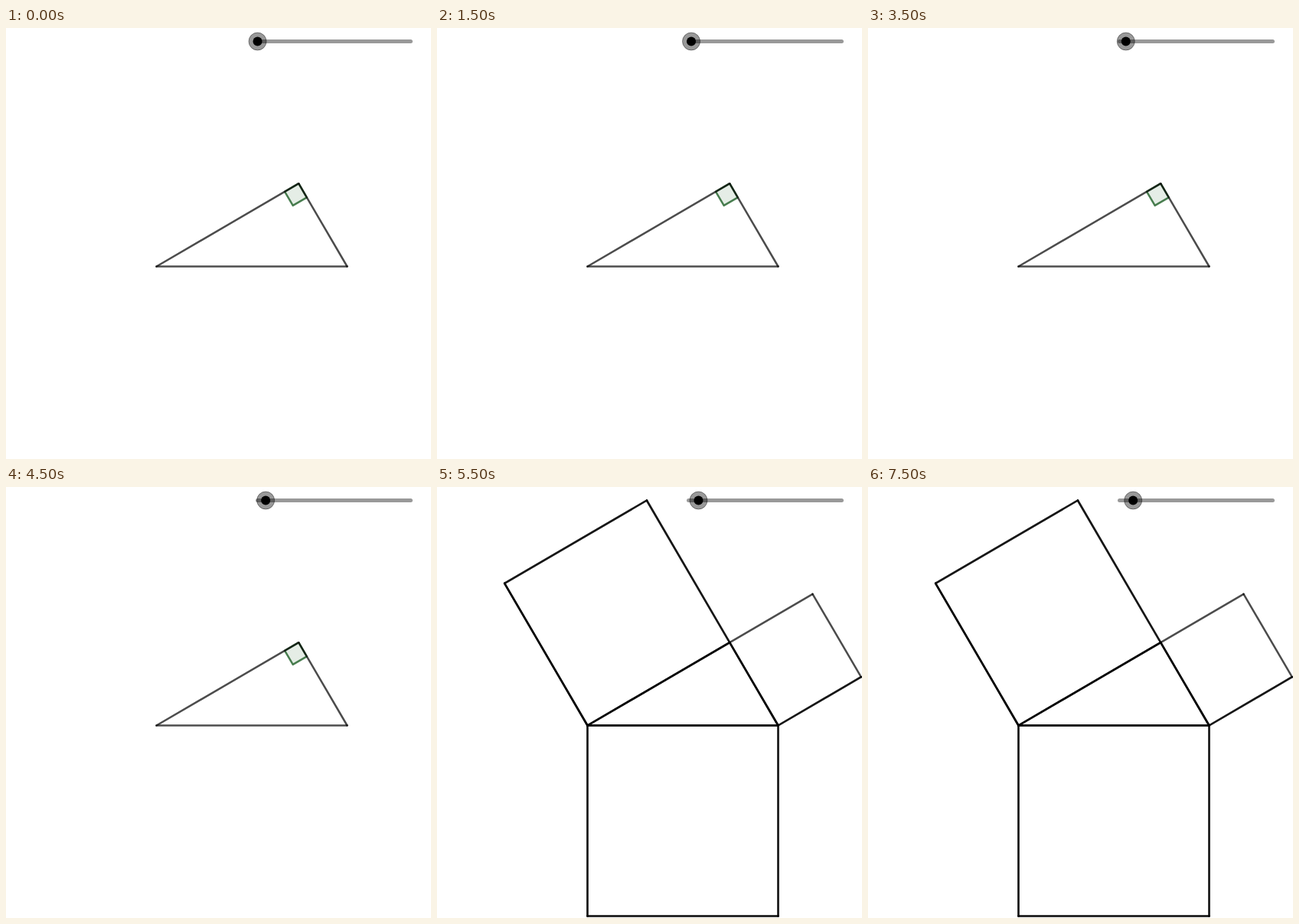
Recreate the animation shown at these times as an HTML page. Size 555x563 px, loop 8000 ms.

```html
<!DOCTYPE html>
<html lang="en">
<head>
<meta charset="utf-8">
<title>Squares on a right triangle</title>
<style>
  html, body { margin: 0; width: 100%; height: 100%; overflow: hidden; background: #fff; }
  svg { display: block; width: 555px; height: 563px; }
  .edge { stroke: #000; stroke-opacity: .7; stroke-width: 2.5; stroke-linecap: round; }
  #corner { fill: rgba(0, 75, 10, .1); stroke: rgba(0, 75, 10, .7); stroke-width: 2.5; stroke-linejoin: round; }
  #track { stroke: #000; stroke-opacity: .4; stroke-width: 5; stroke-linecap: round; }
</style>
</head>
<body>
<svg viewBox="0 0 555 563">
  <polygon id="corner"/>
  <g id="triangle"></g>
  <g id="squares"></g>
  <line id="track" x1="328.5" y1="17.5" x2="528.5" y2="17.5"/>
  <g id="knob">
    <circle r="11.5" fill="#000" fill-opacity=".4" stroke="#000" stroke-opacity=".4"/>
    <circle r="6"/>
  </g>
</svg>
<script>
  const LOOP = 8000, STEP = 500;
  const SQUARES_AT = 5000, CORNER_OFF = 5500;
  const KNOB_START = 328.5, KNOB_STEP = 1.18;

  const $ = id => document.getElementById(id);
  const add = (p, q) => [p[0] + q[0], p[1] + q[1]];
  const sub = (p, q) => [p[0] - q[0], p[1] - q[1]];
  const turn = ([x, y]) => [y, -x];
  const along = (p, q, d) => {
    const v = sub(q, p), k = d / Math.hypot(...v);
    return [v[0] * k, v[1] * k];
  };

  const A = [196.5, 311.5], B = [445.5, 311.5], C = [382.2, 203.2];

  // Outer corners of the square on each side
  const outer = (p, q) => [p, q].map(v => add(v, turn(sub(q, p))));
  const [A1, C1] = outer(A, C);
  const [C2, B2] = outer(C, B);
  const [B3, A3] = outer(B, A);

  // Overlapping translucent passes build up the darker lines
  function edge(group, p, q, passes = 1) {
    for (let i = 0; i < passes; i++) {
      const line = document.createElementNS('http://www.w3.org/2000/svg', 'line');
      const ends = { x1: p[0], y1: p[1], x2: q[0], y2: q[1], class: 'edge' };
      for (const key in ends) line.setAttribute(key, ends[key]);
      group.append(line);
    }
  }

  const triangle = $('triangle'), squares = $('squares'), corner = $('corner'), knob = $('knob');

  [[A, B], [B, C], [C, A]].forEach(([p, q]) => {
    edge(triangle, p, q);
    edge(squares, p, q, 2);
  });
  [
    [A, A1, 3], [A1, C1, 2], [C1, C, 2],
    [C, C2, 1], [C2, B2, 1], [B2, B, 2],
    [B, B3, 2], [B3, A3, 2], [A3, A, 2]
  ].forEach(([p, q, n]) => edge(squares, p, q, n));

  const toA = along(C, A, 21), toB = along(C, B, 21);
  corner.setAttribute('points',
    [C, add(C, toA), add(add(C, toA), toB), add(C, toB)].join(' '));

  const show = (el, on) => { el.style.visibility = on ? 'visible' : 'hidden'; };

  function draw(now) {
    const t = now % LOOP;
    const x = KNOB_START + KNOB_STEP * Math.floor(t / STEP);
    knob.setAttribute('transform', `translate(${x} 17.5)`);
    show(squares, t >= SQUARES_AT);
    show(corner, t < CORNER_OFF);
  }

  const start = performance.now();
  function tick() {
    draw(performance.now() - start);
    requestAnimationFrame(tick);
  }
  tick();
</script>
</body>
</html>
```
